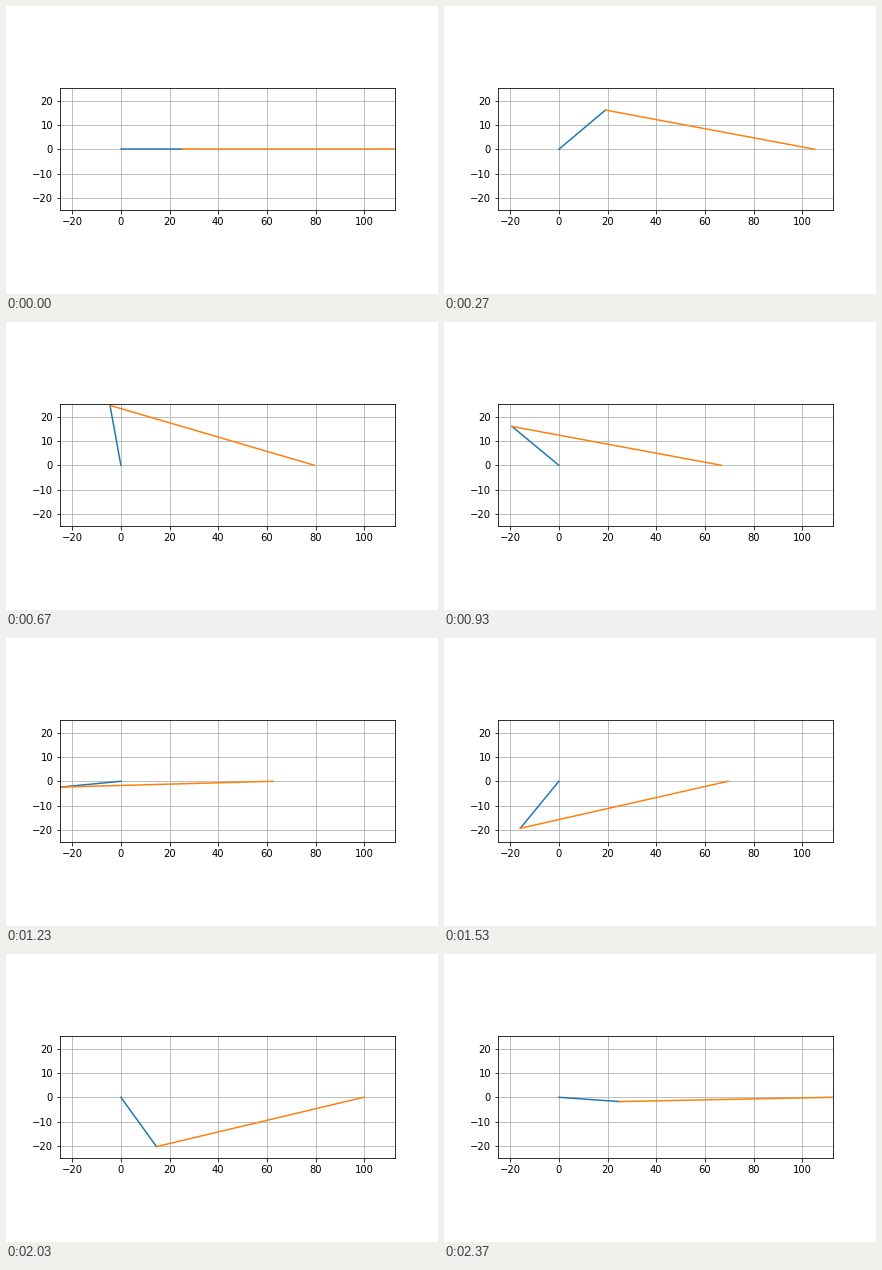
These frames come from a looping animation (432x288 px, 2410 ms). A matplotlib script:

```python
import math

import matplotlib.pyplot as plt
from matplotlib.animation import FuncAnimation

CRANK = 25
ROD = 87.5
STEP = 0.0875      # crank turn per pose, in radians
POSES = 72
TICK_MS = 10
TICKS = 241

plt.rcParams["font.family"] = "DejaVu Sans"

fig, ax = plt.subplots(figsize=(6, 4), dpi=72)
fig.subplots_adjust(left=0.125, right=0.9, bottom=0.125, top=0.88)
ax.set_aspect("equal")
ax.set_xlim(-CRANK, CRANK + ROD)
ax.set_ylim(-CRANK, CRANK)
ax.set_xticks(range(-20, 101, 20))
ax.set_yticks(range(-20, 21, 10))
ax.grid(True)

crank, = ax.plot([], [], color="tab:blue", lw=1.5)
rod, = ax.plot([], [], color="tab:orange", lw=1.5)


def pose_at(tick):
    """Poses run at 30 per second, rounded to whole ticks."""
    return min((6 * tick + 3) // 20, POSES - 1)


def update(tick):
    angle = STEP * pose_at(tick)
    x, y = CRANK * math.cos(angle), CRANK * math.sin(angle)
    slider = x + math.sqrt(ROD**2 - y**2)
    crank.set_data([0, x], [0, y])
    rod.set_data([x, slider], [y, 0])
    return crank, rod


anim = FuncAnimation(fig, update, frames=TICKS, interval=TICK_MS,
                     init_func=lambda: update(0), repeat=True, repeat_delay=0)
plt.show()
```
